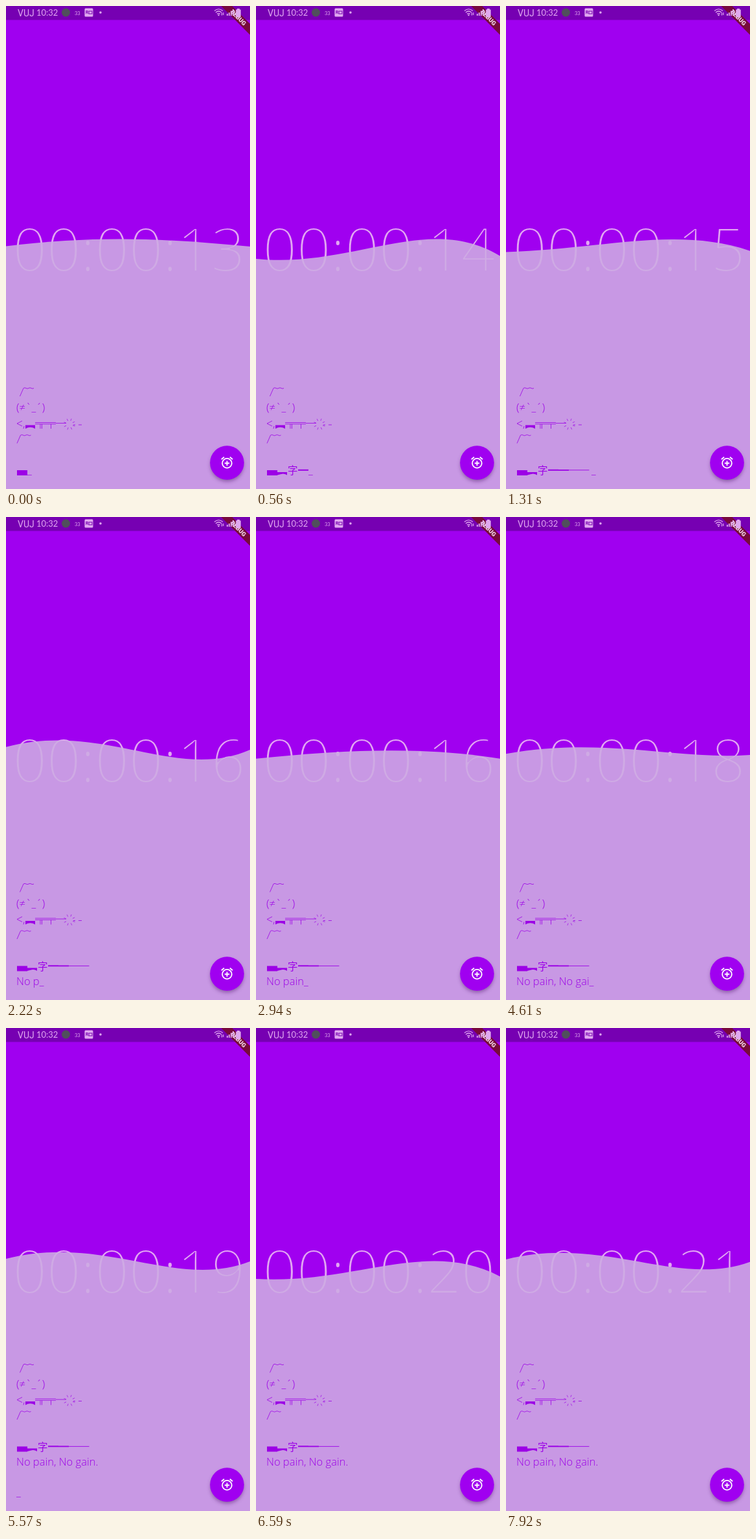
Recreate the animation shown at these times as an HTML page. Size 377x745 px, loop 7990 ms.

```html
<!DOCTYPE html>
<html lang="en">
<head>
<meta charset="utf-8">
<title>Stopwatch</title>
<style>
  html, body { margin: 0; width: 100%; height: 100%; overflow: hidden; background: #a000f0; }
  svg { display: block; width: 377px; height: 745px; }
  text { white-space: pre; }
  .thin { font-family: "Open Sans", sans-serif; font-weight: 300; }
  #clock { fill: #fff; stroke: #000; stroke-width: 2; }
  .roboto .thin { font-family: Roboto, sans-serif; font-weight: 100; }
  .roboto #clock { stroke: none; letter-spacing: 2.2px; }
  .line { fill: none; stroke: #9c00e6; stroke-width: .8; }
</style>
</head>
<body>
<svg id="stage" viewBox="0 0 377 745">
  <defs>
    <filter id="soft" x="-50%" y="-50%" width="200%" height="200%"><feGaussianBlur stdDeviation="3"/></filter>
    <path id="roof" d="M0 14L5.5 1.5q2 -1.4 4 0t4 0t4 0t4 0"/>
    <!-- The black outline trims the light digits to hairlines. -->
    <mask id="digits" maskUnits="userSpaceOnUse" x="0" y="320" width="377" height="110">
      <text id="clock" class="thin" x="190" y="408.500" font-size="92" text-anchor="middle"></text>
    </mask>
  </defs>
  <rect width="377" height="745" fill="#a000f0"/>
  <rect y="320" width="377" height="110" fill="#e2a6f2" mask="url(#digits)"/>
  <path id="wave" fill="#cdabe3" fill-opacity=".89"/>

  <g id="note" fill="#9c00e6">
    <use href="#roof" class="line" x="21.500" y="588"/>
    <text class="thin" x="16" y="625" font-size="16.500">(≠`_´)</text>
    <g class="line">
      <path d="M25 640l-8 4l8 4M28 648l-1 4M45 642.500h32M45 644.800h32M53 645v7M55.500 645v7M69.500 645v7M77 643.500h16M104 646h3M112 646h5"/>
      <g id="rays" stroke-width=".6"></g>
    </g>
    <path d="M30 646.500h15v5.500q-7.500 -4.500 -15 0z"/>
    <use href="#roof" class="line" x="17" y="660.500"/>
    <g id="gun">
      <rect x="17" y="716" width="16" height="8"/>
      <path d="M33 719h15v4.500q-5 -3 -9 -1.500l-6 1.500z"/>
      <text x="49" y="722" font-size="15.500" font-family="'Noto Sans CJK SC', 'Noto Sans CJK JP', 'Noto Sans CJK', sans-serif">字</text>
      <rect x="65" y="714.800" width="16" height="2"/>
      <rect x="81" y="715" width="16" height="1.800"/>
      <rect x="97" y="715.400" width="31.500" height=".9"/>
    </g>
    <text id="typed" class="thin" font-size="16.500"></text>
  </g>

  <circle cx="341.500" cy="708" r="25" fill="#40105c" opacity=".5" filter="url(#soft)"/>
  <circle cx="341.500" cy="704.500" r="26.300" fill="#a000f0"/>
  <g transform="translate(330.500 693.300) scale(.917)" fill="none" stroke="#fff" stroke-width="2">
    <circle cx="12" cy="13" r="8"/>
    <path d="M12 9v8M8 13h8M2.600 6.500l4.600 -3.900M21.400 6.500l-4.600 -3.900"/>
  </g>

  <rect width="377" height="21.500" fill="#7600b2"/>
  <g transform="translate(377 0) rotate(45)">
    <rect x="-32" y="19.500" width="64" height="12" fill="#780a3c"/>
    <text y="28.600" font-family="Roboto, sans-serif" font-size="9.200" font-weight="900" text-anchor="middle" fill="#f3dfee">DEBUG</text>
  </g>
  <g fill="#e0a8f0">
    <text x="18" y="15.500" font-family="Roboto, sans-serif" font-size="14">VUJ</text>
    <text x="47" y="15" font-family="Lato, sans-serif" font-size="13">10:32</text>
    <circle cx="92.500" cy="10" r="6.500" fill="#50505c"/>
    <text x="106" y="13.500" font-family="Lato, sans-serif" font-size="7.500">33</text>
    <rect x="121.500" y="3.500" width="13" height="13" rx="1.500"/>
    <text x="123" y="12.300" font-family="Roboto, sans-serif" font-size="6.500" font-weight="700" fill="#7600b2">R</text>
    <rect x="128" y="8" width="5" height="4" fill="none" stroke="#7600b2"/>
    <circle cx="146" cy="10" r="1.800"/>
    <path d="M322 7.500q6.500 -5.500 13 0M324 10q4.500 -4 9 0M326 12.300q2.500 -2 5 0M333.500 14.500v-4M335.800 10v4" fill="none" stroke="#e0a8f0" stroke-width="1.200"/>
    <circle cx="328.500" cy="14" r="1.200"/>
    <path d="M341 15v-3h1.800v3zM344 15v-5h1.800v5zM347 15v-7.500h1.800v7.500zM350 15v-10h1.800v10z"/>
    <path d="M357 5.500v-1.500h4v1.500h1.800v11.500h-7.600v-11.500z"/>
  </g>
</svg>
<script>
const LOOP = 7990, W = 377, H = 745, LINE = 23.5;
const KEY_MS = 210, BREAK_AT = 1320, GUN_KEYS = 8;
const PHRASE = 'No pain, No gain.';
const $ = id => document.getElementById(id);

// Runs of screen updates: start, end, count. The picture rests between them.
const RUNS = [
  [0, 0, 1], [50, 800, 12], [870, 1130, 5], [1310, 1780, 8], [1960, 2460, 8],
  [2680, 3130, 8], [3310, 3760, 8], [3960, 4430, 8], [4610, 5060, 8],
  [5240, 6010, 12], [6080, 6340, 5], [6590, 7040, 8], [7220, 7670, 8], [7920, 7920, 1]
];
// Time and wave phase; even phases are the low end, odd phases the high end.
const PHASE = [[0, -.53], [1310, .39], [2220, 1], [3570, 1.95], [4610, 2.62], [6590, 3.753], [7920, 4.82], [LOOP, 4.87]];

const lerp = (a, b, k) => a + (b - a) * k;

function lastUpdate(t) {
  const [start, end, count] = RUNS.filter(run => run[0] <= t).pop();
  const step = (end - start) / Math.max(1, count - 1) || 1;
  return start + step * Math.min(count - 1, Math.floor((t - start) / step + 1e-6));
}

function phaseAt(t) {
  const i = Math.max(1, PHASE.findIndex(key => key[0] > t));
  const [t0, p0] = PHASE[i - 1], [t1, p1] = PHASE[i];
  return lerp(p0, p1, (t - t0) / (t1 - t0));
}

// cubic-bezier(.42, 0, .58, 1), solved by bisection
function easeInOut(x) {
  let lo = 0, hi = 1;
  for (let i = 0; i < 20; i++) {
    const s = (lo + hi) / 2;
    if (3 * s * (1 - s) * lerp(.42, .58, s) + s ** 3 < x) lo = s; else hi = s;
  }
  return lo * lo * (3 - 2 * lo);
}

function drawWave(t) {
  const phase = (phaseAt(t) + 2) % 2;
  const k = easeInOut(phase < 1 ? phase : 2 - phase);
  const y = (from, to) => (H / lerp(from, to, k)).toFixed(2);
  $('wave').setAttribute('d', `M0 ${y(1.9, 2.1)}C${W * .4} ${y(1.81, 2.37)} ${W * .7} ${y(2.37, 1.82)} ${W} ${y(1.925, 2.075)}V${H}H0Z`);
}

function drawNote(t) {
  const keys = Math.floor((t - BREAK_AT) / KEY_MS) + GUN_KEYS;
  const letters = keys - GUN_KEYS;
  const breaks = letters < 0 ? 0 : 1 + Math.min(2, Math.max(0, letters - PHRASE.length));
  [...$('gun').children].forEach((part, i) => part.setAttribute('visibility', i < keys ? 'visible' : 'hidden'));

  const gunEnd = keys < 6 ? 17 + 16 * keys : keys < 7 ? 129 : 132;
  const cursor = letters < PHRASE.length + 4 ? '_' : '';
  const onPhrase = letters >= 0 && breaks === 1;
  const typed = $('typed');
  typed.setAttribute('x', letters < 0 ? gunEnd : 16);
  typed.setAttribute('y', 721.5 + LINE * Math.min(1, breaks));
  typed.textContent = letters < 0 ? '_' : PHRASE.slice(0, letters) + (onPhrase ? cursor : '');
  if (breaks > 1 && cursor) {
    const tail = document.createElementNS('http://www.w3.org/2000/svg', 'tspan');
    tail.setAttribute('x', 16);
    tail.setAttribute('dy', LINE * (breaks - 1));
    tail.textContent = cursor;
    typed.append(tail);
  }
  $('note').setAttribute('transform', `translate(0 ${-LINE * breaks})`);
}

function render(now) {
  const t = lastUpdate(now % LOOP);
  $('clock').textContent = '00:00:' + (13 + Math.floor((t + 940) / 1000));
  drawWave(t);
  drawNote(t);
}

function setup() {
  const pen = document.createElement('canvas').getContext('2d');
  const width = weight => {
    pen.font = `${weight} 90px "Open Sans"`;
    return pen.measureText('No gain:').width;
  };
  if (width(300) === width(400)) $('stage').classList.add('roboto');
  $('rays').innerHTML = Array.from({ length: 8 }, (_, i) =>
    `<path d="M5.5 0h3.500" transform="translate(98 645) rotate(${i * 45 + 20})"/>`).join('');
}

setup();
const began = performance.now();
(function tick() {
  render(performance.now() - began);
  requestAnimationFrame(tick);
})();
</script>
</body>
</html>
```
